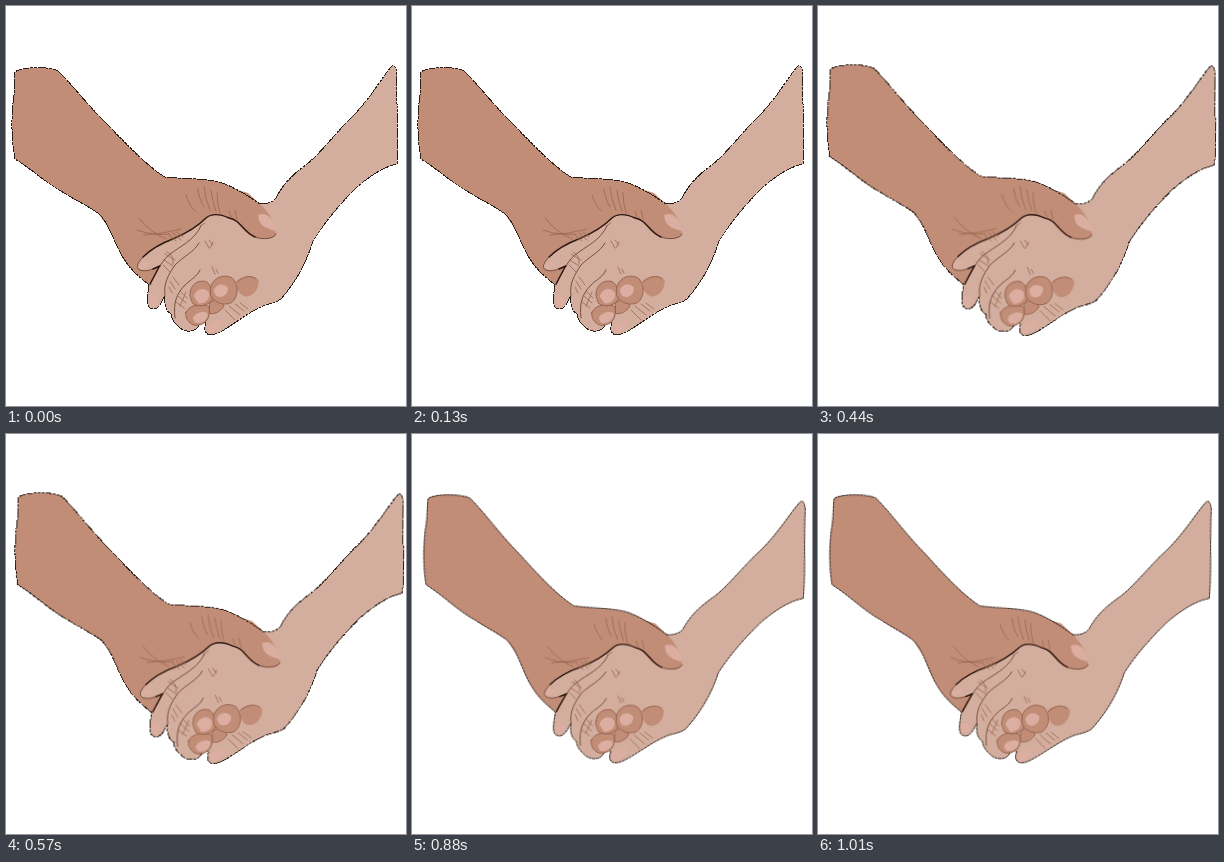
Recreate the animation shown at these times as an HTML page. Size 400x400 px, loop 1.1 s.

```html
<!DOCTYPE html>
<html lang="en">
<head>
<meta charset="utf-8">
<title>Holding hands</title>
<style>
  html, body { margin: 0; width: 100%; height: 100%; overflow: hidden; background: #fff; }
  svg { display: block; width: 100vw; height: 100vh; }
  path { stroke-linecap: round; stroke-linejoin: round; }

  .dark { fill: #c28d77; }
  .light { fill: #d3ad9d; }
  .nail { fill: #dbaea1; }
  .edge { fill: none; stroke: #2b1f18; stroke-width: 1; stroke-linecap: butt; stroke-dasharray: 2.4 1.3; shape-rendering: crispEdges; }
  .fold { fill: none; stroke: #6d4535; stroke-width: .9; }
  .crease { fill: none; stroke: #96654f; stroke-width: .75; }
  .shade { fill: none; stroke: #2c1710; stroke-width: 1.4; }
  .tips { stroke: #8d5b47; stroke-width: .8; }

  .hands { transform-origin: 200px 200px; animation: sway 1100ms step-end infinite; }
  @keyframes sway {
    0%, 100% { transform: none; }
    20% { transform: translate(12px, -9.5px) rotate(-6deg); }
    40% { transform: translate(3.8px, -.2px) rotate(.5deg) scale(1.007); }
    60% { transform: translate(-10.4px, -9.2px) rotate(6.1deg) scale(1.006); }
    80% { transform: translate(1.6px, 1.5px) rotate(1.35deg) scale(.988); }
  }
</style>
</head>
<body>
<svg viewBox="0 0 400 400" role="img" aria-label="Two hands holding each other">
  <defs>
    <path id="arm" d="M254 198 C241 189 226 180 213 176 C197 172 176 173 159 171 C141 160 119 137 102.500 119.500 C83 101 65 77 51.500 64.500 C42 60 14 61 9 66 C8 76 9 86 7 97 C5 118 6 137 9 153 C27 164 41 178 60 188 C71 195 82 200 92 207 C104 218 109 240 118 253 C126 266 135 272 143 279"/>
    <path id="palm" d="M254 198 C260 198 266 197 270 192 C278 176 289 167 301 158 C315 147 332 124 346 111 C363 94 375 73 385 61 C388 58 390 60 391 68 C390 97 393 128 391 158 C377 161 364 170 350 182 C333 199 318 217 307 235 C302 251 294 271 275 293 C268 298 260 298 255 301 C241 307 226 320 212 327 C203 331 198 328 199 321 L200 317 C196 316 194 317 192 321 C188 327 178 326 173 321 C168 317 165 312 165 308 C160 305 158 299 159 290 C156 294 154 303 147 303 C140 302 141 294 142 286 L143 279"/>
  </defs>

  <g class="hands">
    <use href="#arm" class="dark"/>
    <path class="dark" d="M143 279 L180 290 L262 240 L254 198 L160 171 L92 207Z"/>
    <use href="#palm" class="light"/>
    <path class="light" d="M143 279 C145 274 150 267 153 260 C146 264 139 266 134 264 C129 262 132 256 137 251 C145 243 156 237 168 232.500 C183 226 193 219 200 212 C206 207 214 208 223 212 L254 198 L262 240 L190 300Z"/>

    <!-- thumb -->
    <path class="dark" d="M212 178 L242 187 L254 198 C263 206 269 217 270 228 C268 233 259 234 249 231 C240 229 236 222 230 216 C225 212 217 209 209 208Z"/>
    <path class="nail" d="M252 209 C257 207 262 208 266 214 C269 218 270 222 270 225 C263 223 255 221 253 214Z"/>

    <use href="#arm" class="edge"/>
    <use href="#palm" class="edge"/>

    <!-- finger outlines -->
    <path class="fold" d="M144 279 C148 271 155 255 163 249 C174 240 188 235 195 220
      M159 290 C157 277 163 268 169 259 C178 250 188 246 193 237
      M169 312 C167 296 171 288 178 280 C185 273 191 271 194 264
      M153 260 C146 264 139 266 134 264 C129 262 132 256 137 251
      M249 231 C257 234 268 233 270 228"/>
    <path class="nail" d="M132 261 C134 256 139 254 144 257 C142 262 135 264 132 261Z M143 292 C146 288 151 290 153 294 C151 302 143 303 143 292Z M201 320 C206 315 212 313 217 314 C216 321 210 326 203 328Z"/>
    <path class="shade" d="M137 251 C145 243 156 237 168 232.500 C183 226 193 219 200 212 C206 207 214 208 223 212 C235 214 237 226 249 231 M144 278 L153 261 M147 263 L154 260"/>

    <!-- dark fingertips -->
    <g transform="translate(.8 .5)">
      <g class="dark tips">
        <path stroke="none" d="M230 274 C237 269 248 268 252 274 C252 283 246 290 239 290 C232 289 229 281 230 274Z"/>
        <path d="M203 296 C209 291 217 295 217 300 C213 306 207 308 203 307Z"/>
        <path d="M179 306 C182 299 193 296 202 300 C204 309 201 318 190 319 C183 319 178 312 179 306Z"/>
        <path d="M183 289 C183 278 191 273 199 275 C205 278 207 288 205 294 C200 300 191 301 186 297Z"/>
        <path d="M204 280 C207 270 219 267 226 272 C232 279 232 290 225 296 C217 300 207 296 204 289Z"/>
        <path fill="none" d="M230 276 C235 270 244 268 249 272"/>
      </g>
      <path class="nail" d="M187 290 C189 282 198 280 202 286 C204 292 199 297 192 297Z M207 284 C209 277 217 276 221 281 C222 288 215 293 209 289Z M186 312 C188 306 197 304 201 307 C201 314 194 318 188 316Z"/>
    </g>

    <!-- wrinkles -->
    <path class="crease" d="M180 189 Q183 199 189 205 M192 183 Q193 193 198 201 M198 181 Q199 193 204 204 M205 184 Q206 195 210 205 M211 187 Q211 197 214 207 M229 204 L231 213 M223 205 L225 211
      M131 224 Q147 230 164 228 M133 212 Q145 227 160 233 M138 229 Q157 228 175 223"/>
    <path class="crease" d="M163 229 L170 235 M167 227 L175 234 M171 226 L177 231 M164 235 L176 229
      M159 248 L169 254 M158 254 L167 260 M157 259 L164 266 M161 246 Q168 249 167 258
      M164 275 L169 283 M167 271 L173 279 M163 281 L166 287
      M171 289 L180 297 M174 285 L181 292 M170 296 L178 302 M180 286 L174 300
      M199 235 L203 242 M203 234 L207 239 M204 242 L207 236 M194 220 L199 217
      M206 261 L209 268 M210 263 L212 267
      M219 304 L229 314 M223 300 L234 309 M229 298 L238 305 M234 297 L242 303"/>
  </g>
</svg>
</body>
</html>
```
